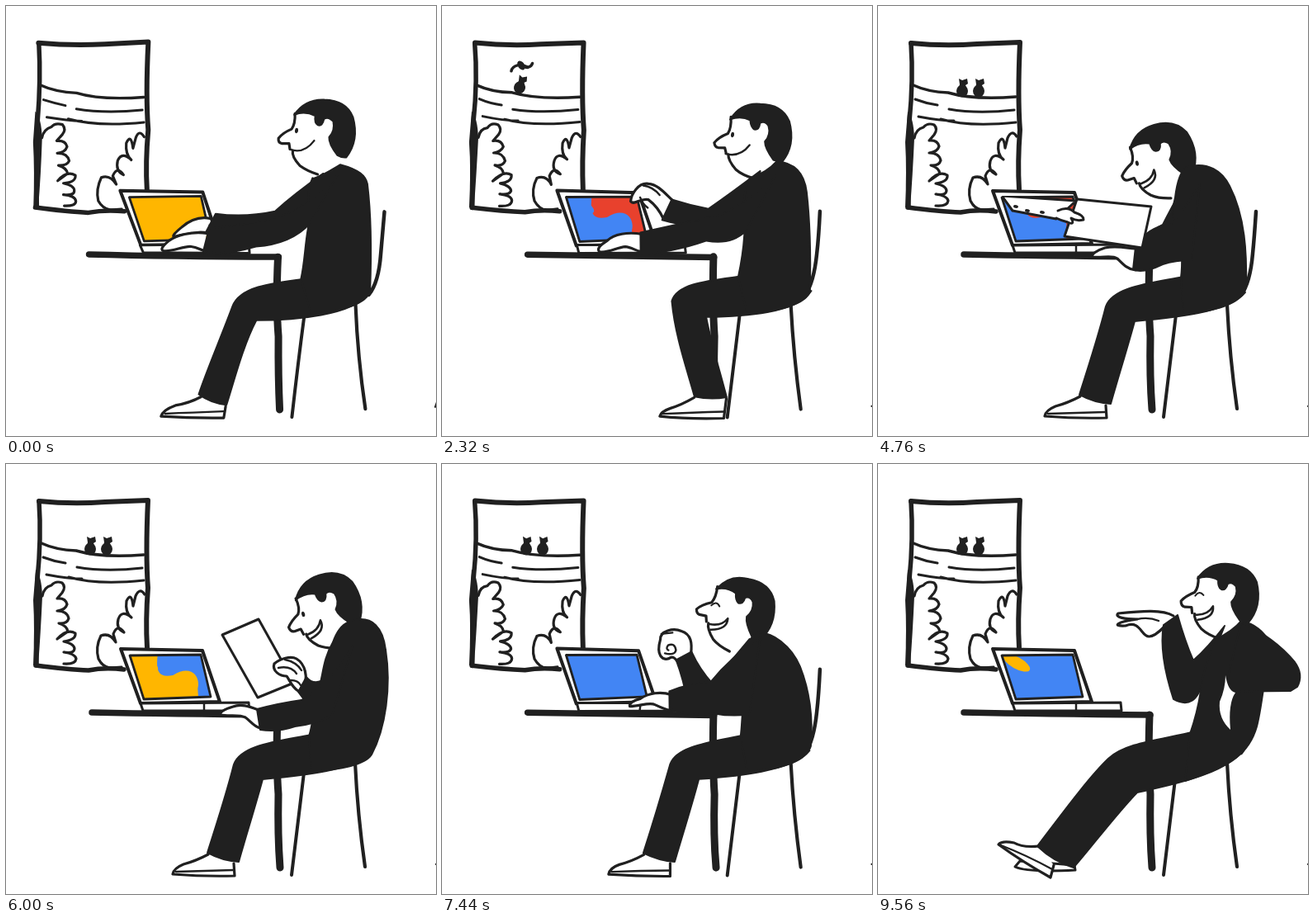
Animation of 521x521 px, one loop 9.6 s. Source, as an HTML page with a canvas:

```html
<!DOCTYPE html>
<html lang="en">
<head>
<meta charset="utf-8">
<title>At the desk</title>
<style>
html, body { margin: 0; width: 100%; height: 100%; overflow: hidden; background: #fff; }
canvas { display: block; width: 100vw; height: 100vh; }
</style>
</head>
<body>
<canvas id="stage" width="521" height="521"></canvas>
<script>
const ctx = document.getElementById('stage').getContext('2d');
const LOOP = 9600, STEP = 40;
const INK = '#202020', PAPER = '#fff', YELLOW = '#ffb600', BLUE = '#4285f4', RED = '#e8412d';

// Poses: 0 typing, 1 reach, 2 swipe, 3 lean in, 4 read, 5 cheer, 6 relax
const POSES = [[0, 0], [1900, 0], [2240, 1], [2450, 1], [2900, 2], [4000, 2], [4450, 3],
  [5150, 3], [5700, 4], [6600, 4], [7050, 5], [8150, 5], [8800, 6], [9600, 6]];

const sit = 'M374 208 C388 203 398 196 406 189 C430 190 440 205 442 225 C447 265 446 310 446 345 C442 362 405 370 370 373 L359 329 C362 312 365 295 366 278 C366 255 362 230 374 208 Z';
const TORSO = [
  'M372 209 C385 205 396 198 405 192 C428 198 436 206 438 215 C443 260 442 310 441 345 C438 362 405 370 370 372 L357 331 C362 312 362 290 366 270 C368 250 362 230 372 209 Z',
  sit, sit,
  'M360 232 C362 215 366 200 374 195 C400 188 417 200 426 218 C445 255 447 300 446 340 C442 362 405 370 370 373 L367 329 C369 315 368 300 368 290 C358 275 355 250 360 232 Z',
  'M396 216 C400 205 405 195 418 190 C445 182 457 200 460 225 C467 270 460 320 443 352 C435 365 405 370 370 373 L367 330 C372 315 372 300 375 285 C385 260 382 240 396 216 Z',
  'M358 235 C368 222 372 212 380 206 C400 200 425 222 434 245 C450 285 448 320 447 342 C440 362 405 370 370 373 L362 330 C363 315 363 310 364 300 C345 280 340 260 358 235 Z',
  'M408 213 C420 207 432 200 440 190 C458 194 466 203 475 215 C468 260 466 290 459 318 C450 350 430 365 372 384 L378 327 C384 310 388 295 391 275 C393 255 400 235 408 213 Z'
];

const legDown = 'M362 328 C325 332 285 335 278 358 C283 400 297 440 306 473 Q325 478 345 474 C336 440 326 410 320 377 C365 376 430 372 447 345 Z';
const legOut = 'M370 328 C330 336 285 340 276 364 C267 400 254 440 244 471 Q262 481 282 482 C291 450 302 415 311 382 C355 378 425 372 445 347 Z';
const LEG = [
  'M362 330 C320 336 283 340 275 364 C260 402 243 440 233 471 Q248 482 267 483 C276 455 287 412 303 381 C350 380 420 375 441 347 Z',
  legDown, legDown, legOut, legOut, legOut,
  'M384 324 C345 334 300 337 279 357 C255 380 222 425 193 463 Q213 482 237 489 C262 460 288 425 314 398 C350 390 430 375 447 340 Z'
];

const shoeDown = 'M306 474 Q290 483 277 487 Q265 492 264 497 Q300 501 342 499 L344 476';
const shoeOut = 'M245 473 Q230 481 215 485 Q203 490 202 497 Q240 500 277 499 L276 484';
const SHOE = [
  'M236 474 Q222 481 205 484 Q190 489 188 497 Q225 500 264 499 L266 485',
  shoeDown, shoeDown, shoeOut, shoeOut, shoeOut,
  'M195 463 Q175 465 165 459 Q150 456 146 461 Q175 482 209 501 L213 486'
];
const soleDown = 'M268 494 Q302 493 342 491', soleOut = 'M206 494 Q240 493 275 492';
const SOLE = ['M192 494 Q225 492 263 491', soleDown, soleDown, soleOut, soleOut, soleOut, 'M149 462 Q180 474 211 491'];

const FAR_ARM = [
  'M385 203 Q350 228 326 249 Q290 257 254 252 L241 276 Q285 285 320 280 Q350 275 372 262 Z',
  'M385 200 Q350 228 323 246 Q300 242 279 235 L266 260 Q290 266 310 265 Q345 262 372 262 Z',
  'M385 200 Q350 228 323 247 Q290 242 253 234 L240 252 Q270 268 300 268 Q345 266 372 262 Z',
  'M372 215 Q355 245 345 265 Q335 270 330 275 L325 292 Q345 300 350 298 Q360 290 370 262 Z',
  'M405 215 Q385 240 384 262 Q372 268 364 258 L354 276 Q365 292 378 300 Q395 285 405 262 Z',
  'M372 212 Q350 240 328 266 Q312 250 303 228 L283 238 Q293 262 296 285 Q320 305 365 290 Z',
  'M420 196 Q400 222 382 238 Q372 215 363 183 L346 195 Q340 230 358 285 Q385 300 394 262 Z'
];
const NEAR_ARM = [
  'M402 205 Q365 245 330 256 Q290 266 246 270 L239 297 Q262 303 303 291 Q346 288 368 264 Z',
  'M404 205 Q370 240 335 254 Q300 262 241 275 L240 300 Q275 300 320 285 Q350 290 368 272 Z',
  'M404 205 Q370 240 335 256 Q300 268 272 276 L276 298 Q310 301 340 287 Q355 288 368 276 Z',
  'M390 215 Q370 250 355 264 Q325 268 312 292 L309 319 Q320 325 345 313 Q360 308 380 308 Z',
  'M420 220 Q395 265 358 286 Q330 290 304 297 L308 322 Q330 325 350 318 Q375 315 395 305 Z',
  'M385 210 Q350 235 326 264 Q300 266 276 276 L275 297 Q300 307 330 303 Q350 306 372 303 Z',
  'M440 192 Q480 210 505 240 Q516 255 508 270 L500 275 Q460 275 436 276 Q424 272 424 258 Z'
];

const FAR_HAND = [
  'M247 258 C232 255 220 261 213 268 C206 273 199 280 205 280 C215 276 225 277 232 275 C238 274 241 275 243 275',
  'M281 238 C270 228 262 216 250 215 C238 214 229 228 229 236 C232 242 240 232 250 234 C258 240 264 250 268 258',
  'M251 236 C240 226 228 216 218 218 C208 222 196 236 199 241 C206 244 212 234 222 238 C230 244 236 248 243 250',
  'M372 280 C370 278 368 278 366 280 C365 282 365 284 366 286 C368 288 370 288 372 286 C373 285 374 284 374 283',
  'M360 272 C367 258 362 242 352 236 C345 232 332 236 325 242 C322 251 332 257 340 257 C344 262 346 270 354 275',
  'M301 231 C303 218 302 206 290 202 C280 199 264 202 265 212 C259 232 267 238 275 235 C280 232 282 236 284 238',
  'M358 184 C345 176 320 178 291 181 C286 186 300 188 314 188 C290 191 282 197 300 196 C325 186 316 228 346 198'
];
const NEAR_HAND = [
  'M243 276 C225 273 205 278 198 284 C190 290 186 295 191 297 C200 299 215 291 225 292 C232 293 236 296 240 297',
  'M242 277 C225 274 208 276 200 284 C192 290 187 294 191 297 C200 300 212 292 222 291 C230 292 234 297 240 297',
  'M273 277 C258 276 245 278 237 285 C230 290 226 294 229 297 C238 299 248 291 256 292 C265 294 268 297 275 298',
  'M311 294 C300 293 288 290 275 293 C265 296 258 301 260 304 C270 306 283 301 290 306 C296 312 302 319 312 320',
  'M306 298 C295 294 285 290 275 294 C265 297 258 301 260 304 C270 306 283 303 290 307 C296 311 300 318 308 320',
  'M277 280 C265 276 250 277 240 284 C232 287 226 290 228 293 C240 293 252 288 258 291 C266 295 270 298 276 298',
  'M448 262 C446 260 444 260 442 262 C441 264 441 266 442 268 C444 270 446 270 448 268 C449 267 450 266 450 265'
];
const FINGERS = {
  1: 'M240 232 Q243 240 249 245 M244 218 Q256 219 264 229',
  2: 'M213 237 Q211 246 220 243 M220 217 Q230 220 238 227',
  4: 'M338 237 Q352 240 358 250 M330 247 Q345 244 352 254 M345 262 Q354 262 357 268',
  5: 'M270 230 Q282 233 283 225 Q282 216 274 219 Q270 224 275 226 M266 206 L279 205',
  6: 'M314 188 Q328 185 340 190'
};

// Nose x, y and tilt in degrees
const HEAD = ['329 164 0', '329 169 0', '329 169 0', '296 210 -18', '343 202 -20', '307 179 10', '366 170 2'];
const SMILING = [0, 0, 1, 1, 1, 1, 1], SQUINT = [0, 0, 1, 0, 0, 1, 1];

const SHEET = [[4350, 0], [4720, 1], [5150, 1], [5700, 2], [6600, 2], [6950, 3]];
const SHEETS = [
  'M205 240 L215 245 L212 262 L203 258 Z', 'M241 234 L331 243 L320 293 L226 279 Z',
  'M306 188 L349 265 L305 283 L262 207 Z', 'M284 214 L288 219 L283 223 L279 218 Z'
];

const WIPES = [[1250, RED], [1970, BLUE], [2750, YELLOW], [3700, RED], [4420, BLUE],
  [5640, YELLOW], [6340, RED], [6700, BLUE], [9520, YELLOW]];
const WIPE_MS = 700;
const SCREEN = 'M150 232 L236 231 L248 282 L167 285 Z';

const NUM = /-?\d+(\.\d+)?/g;
let boil = 0;

const clamp = v => Math.min(1, Math.max(0, v));
const ease = v => v < .5 ? 4 * v * v * v : 1 - Math.pow(2 - 2 * v, 3) / 2;
const noise = n => { const s = Math.sin(n * 127.1) * 43758.5453; return (s - Math.floor(s)) * 2 - 1; };

function wobble(d, amp = .7) {
  if (!boil) return d;
  let i = 0;
  return d.replace(NUM, v => +v + noise(++i + boil * 31 + d.length) * amp);
}
function mix(a, b, w) {
  const nb = b.match(NUM);
  let i = 0;
  return a.replace(NUM, v => +v + (nb[i++] - v) * w);
}
function at(keys, t) {
  let i = 0;
  while (i < keys.length - 2 && t >= keys[i + 1][0]) i++;
  const [t0, a] = keys[i], [t1, b] = keys[i + 1];
  return { a, b, w: ease(clamp((t - t0) / (t1 - t0))) };
}
const blend = (set, p) => mix(set[p.a], set[p.b], p.w);

function fill(d, color = INK) {
  ctx.fillStyle = color;
  ctx.fill(new Path2D(wobble(d, .6)));
}
function line(d, width = 3, color) {
  const path = new Path2D(wobble(d));
  if (color) { ctx.fillStyle = color; ctx.fill(path); }
  ctx.strokeStyle = INK;
  ctx.lineWidth = width;
  ctx.stroke(path);
}
const brush = d => line(d, 2, INK);
function oval(x, y, rx, ry, rot = 0, color = INK) {
  ctx.fillStyle = color;
  ctx.beginPath();
  ctx.ellipse(x, y, rx, ry, rot, 0, 7);
  ctx.fill();
}
function group(x, y, rot, draw) {
  ctx.save();
  ctx.translate(x, y);
  ctx.rotate(rot);
  draw();
  ctx.restore();
}

function drawWindow(t) {
  line('M40 45 Q80 49 120 46 L172 44 Q169 110 172 150 Q169 190 171 222', 6);
  line('M40 45 Q43 90 38 140 Q36 190 37 244', 5.5);
  fill('M36 128 Q43 135 44 160 Q42 205 39 244 L33 244 Q35 200 33 165 Z');
  line('M36 244 Q75 249 100 250 Q120 246 143 249', 5.5);
  line('M43 96 Q60 104 85 105 Q115 114 167 110', 3.4);
  line('M45 113 Q58 118 72 120 M86 125 Q120 131 165 126', 3);
  line('M49 134 Q75 139 92 139 M76 137 Q110 147 167 141', 3);
  line('M44 160 Q46 149 55 147 Q60 141 68 144 Q73 149 68 156 L62 163 Q72 162 74 170 Q72 177 62 178 Q74 178 76 187 Q74 194 64 193 Q74 196 75 203 L62 212 Q74 199 84 205 Q85 213 70 215 Q83 218 83 224 Q82 230 70 228 Q84 230 85 236 Q84 243 70 242', 3.2);
  line('M168 158 Q162 149 157 160 L154 172 Q152 154 146 166 Q144 180 152 186 Q140 176 136 188 Q133 200 143 204 Q135 193 130 206 L133 216 Q126 204 115 208 Q108 222 112 236 Q117 246 126 247 L140 246', 3.2);
  drawBirds(t);
}

function perched(x, y, rot) {
  group(x, y, rot, () => {
    oval(0, 4, 7, 7.5);
    fill('M-4 -11 L0 -9 L6 -11 L7 -5 L4 -3 L5 0 L-4 0 L-3 -4 Z');
  });
}
function flying(x, y, flap) {
  group(x, y, 0, () => {
    oval(-1, -1, 4, 6, -.6);
    line(`M-13 ${6 - flap} Q-12 0 -5 -1 M-3 -4 Q3 2 7 2 M3 0 Q10 ${3 + flap} 13 -4`, 3.5);
  });
}
function track(keys, t) {
  const p = at(keys, t), [x, y] = mix(p.a, p.b, p.w).split(' ');
  return [+x, +y];
}
function drawBirds(t) {
  if (t >= 1960) {
    const [x, y] = track([[1960, '78 56'], [2320, '95 95'], [2560, '102 99']], t);
    t < 2200 ? flying(x, y, 4 * Math.sin(t / 40)) : perched(x, y, t < 2480 ? .25 : 0);
  }
  if (t >= 2160) {
    const [x, y] = track([[2160, '80 57'], [2320, '97 73'], [2720, '122 99']], t);
    t < 2640 ? flying(x, y, 4 * Math.sin((t - 2320) / 40)) : perched(x, y, 0);
  }
}

function drawScreen(t) {
  ctx.save();
  ctx.clip(new Path2D(SCREEN));
  ctx.fillStyle = YELLOW;
  ctx.fillRect(140, 220, 130, 80);
  for (const [start, color] of WIPES) {
    const p = clamp((t - start) / WIPE_MS), d = 160 * p - 80;
    if (!p) continue;
    const s = Math.min(1, p / .05);
    oval(168, 241, 18 * s, 7 * s, .5, color);
    ctx.beginPath();
    ctx.moveTo(60, 215);
    ctx.lineTo(182 + d, 215);
    ctx.bezierCurveTo(184 + d, 232, 171 + d, 262, 200 + d, 256);
    ctx.bezierCurveTo(222 + d, 242, 234 + d, 258, 230 + d, 272);
    ctx.lineTo(232 + d, 300);
    ctx.lineTo(60, 300);
    ctx.fill();
  }
  ctx.restore();
  line(SCREEN, 2.8);
}

function drawDesk(t) {
  line('M361 374 Q354 430 346 498', 4);
  line('M423 362 Q426 425 435 488', 4.2);
  line('M458 249 Q456 280 454 300 Q451 335 440 350', 4.5);
  line(`M${boil === 1 ? 100 : 104} 301 Q200 303 330 304`, 7.5);
  line('M329 304 Q327 360 330 400 Q329 450 332 489', 9);
  line('M139 224 L238 226 L259 288 L163 290 Z', 4, PAPER);
  drawScreen(t);
  line('M163 290 L294 289 L295 299 L166 299 Z', 3, PAPER);
  line('M240 290 L240 299', 2.5);
  line(boil === 1 ? 'M522 479 L520 486' : 'M522 484 L521 485', 2);
}

function drawHead(p) {
  const [x, y, tilt] = blend(HEAD, p).match(NUM).map(Number);
  const pose = p.w < .5 ? p.a : p.b;
  group(x, y, tilt * Math.PI / 180, () => {
    ctx.translate(-329, -169);
    fill('M350 135 Q351 148 346 154 Q335 159 330 165 Q330 171 335 172 L343 172 Q346 187 356 198 Q364 205 378 209 L406 192 L396 135 Z', PAPER);
    line('M350 135 Q351 148 346 154 Q335 159 330 165 Q330 171 335 172 L343 172 L344 179', 3.2);
    line('M347 180 Q346 187 356 198 Q364 205 378 209', 3.2);
    brush('M349 137 Q362 117 386 118 Q412 119 421 139 Q429 168 412 189 Q408 189 402 186 Q391 172 391 164 Q399 156 396 145 Q391 139 386 142 Q384 151 378 149 Q374 147 374 138 Q362 132 349 137 Z');
    if (SMILING[pose]) line('M349 181 Q363 181 369 170 Q371 184 351 187', 2.6);
    else line('M344 179 Q361 184 373 168', 2.4);
    if (SQUINT[pose]) line('M347 158 Q352 151 357 157', 2);
    else oval(352, 156, 2, 3.2, .1);
  });
}

function drawHand(set, p, dy) {
  group(0, dy, 0, () => line(blend(set, p), 3.2, PAPER));
}

function drawSheet(t) {
  if (t >= 4350 && t < 6950) line(blend(SHEETS, at(SHEET, t)), 3, PAPER);
}

// Arm that passes the sheet out of the laptop
function drawGiver(t) {
  if (t < 4300 || t > 5250) return;
  const out = ease(clamp((t - 4300) / 400)) * (1 - ease(clamp((t - 4850) / 380)));
  ctx.save();
  ctx.clip(new Path2D('M150 230 L420 230 L420 300 L172 300 Z'));
  ctx.translate(-95 * (1 - out), -12 * (1 - out));
  line('M150 230 L240 236 L216 258 L163 248 Z', 3, PAPER);
  line('M218 248 Q230 242 238 250 Q250 254 249 259 Q240 261 234 257 Q239 266 230 262 Q222 260 216 257', 3, PAPER);
  [[167, 243], [181, 248], [199, 250]].forEach(([x, y]) => oval(x, y, 3, 1.8, .2));
  ctx.restore();
}

function drawMan(t, p) {
  const tap = t < 1900 ? 2 * Math.sin(t / 60) : 0;
  const rest = p.a === 6 || (p.b === 6 && p.w > .8);
  const held = p.a === p.b || p.w < .15 ? p.a : p.w > .85 ? p.b : -1;

  if (rest) line('M172 481 L166 488 Q180 495 239 492 L238 486 Z', 3, PAPER);
  line(blend(SHOE, p), 3.2, PAPER);
  line(blend(SOLE, p), 2.4);
  brush(blend(LEG, p));
  drawHead(p);
  if (t >= 5400) drawSheet(t);
  drawHand(FAR_HAND, p, -tap);
  if (FINGERS[held]) line(FINGERS[held], 2.4);
  brush(blend(FAR_ARM, p));
  drawHand(NEAR_HAND, p, tap);
  brush(blend(TORSO, p));
  brush(blend(NEAR_ARM, p));
  if (rest) fill('M421 256 Q424 275 433 277 Q424 290 427 322 Q412 308 414 288 Q421 272 421 256 Z', PAPER);
  if (t < 5400) drawSheet(t);
}

function draw(now) {
  const t = Math.floor(now % LOOP / STEP) * STEP;
  boil = [1, 1, 2, 2, 2, 0, 0, 0][t / STEP % 8];
  ctx.fillStyle = PAPER;
  ctx.fillRect(0, 0, 521, 521);
  ctx.lineCap = ctx.lineJoin = 'round';
  drawWindow(t);
  drawDesk(t);
  drawMan(t, at(POSES, t));
  drawGiver(t);
}

const begin = performance.now();
function tick() {
  draw(performance.now() - begin);
  requestAnimationFrame(tick);
}
tick();
</script>
</body>
</html>
```
